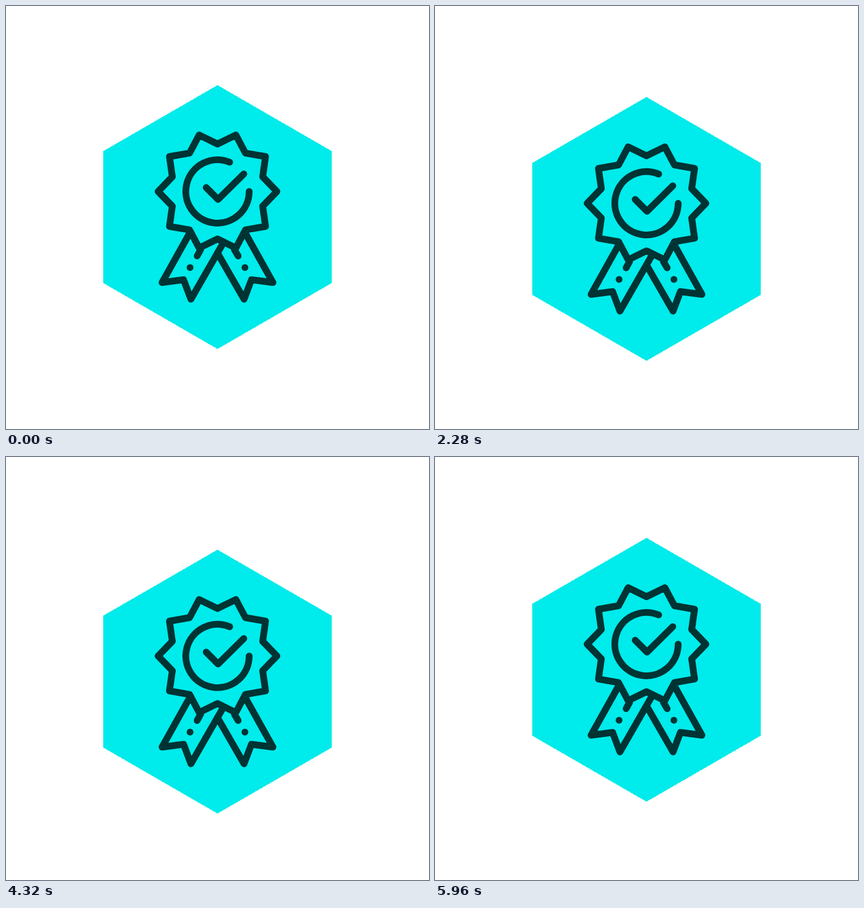
Animation of 748x748 px, one loop 6000 ms. Source, as an HTML page:

```html
<!DOCTYPE html>
<html lang="en">
<head>
<meta charset="utf-8">
<title>Award badge</title>
<style>
  html, body { margin: 0; width: 100%; height: 100%; overflow: hidden; background: #fff; }
  svg { display: block; width: 100vw; height: 100vh; }
  .lines { fill: none; stroke: #033; stroke-width: 12; stroke-linecap: round; stroke-linejoin: round; }
  .dots { fill: #033; }
</style>
</head>
<body>
<svg viewBox="0 0 748 748">
  <g id="badge">
    <polygon id="hex" fill="#00ebeb" shape-rendering="crispEdges"/>
    <g class="lines">
      <polygon id="star"/>
      <path d="M430 328A56 56 0 1 1 395.5 276.2"/>
      <path d="M354 321L375 342L420.5 297"/>
      <path d="M324.6 402L276 489L314 484L327 518.5L383 421"/>
      <path d="M423.4 402L472 489L434 484L421 518.5L374 437"/>
      <path d="M344 431L338 442M404 431L410.5 442"/>
    </g>
    <g class="dots">
      <circle cx="325.5" cy="462.5" r="6"/>
      <circle cx="422.5" cy="462.5" r="6"/>
    </g>
  </g>
</svg>
<script>
  const PERIOD = 2000, DROP = 74.8, TICK = 40;
  const $ = id => document.getElementById(id);

  // Vertices around (374, cy), cycling through the given radii.
  const ring = (count, cy, radii, start) => Array.from({ length: count }, (_, i) => {
    const a = start + i * 2 * Math.PI / count, r = radii[i % radii.length];
    return `${(374 + r * Math.cos(a)).toFixed(2)},${(cy + r * Math.sin(a)).toFixed(2)}`;
  }).join(' ');

  $('hex').setAttribute('points', ring(6, 373.25, [233.25], -Math.PI / 2));
  $('star').setAttribute('points', ring(20, 328, [105, 84], 0));

  const origin = performance.now();

  function draw(now) {
    const t = Math.floor(Math.max(0, now - origin) / TICK) * TICK % PERIOD;
    const y = DROP * (1 - Math.abs(2 * t / PERIOD - 1));
    $('badge').setAttribute('transform', `translate(0 ${y.toFixed(2)})`);
    requestAnimationFrame(draw);
  }
  draw(origin);
</script>
</body>
</html>
```
